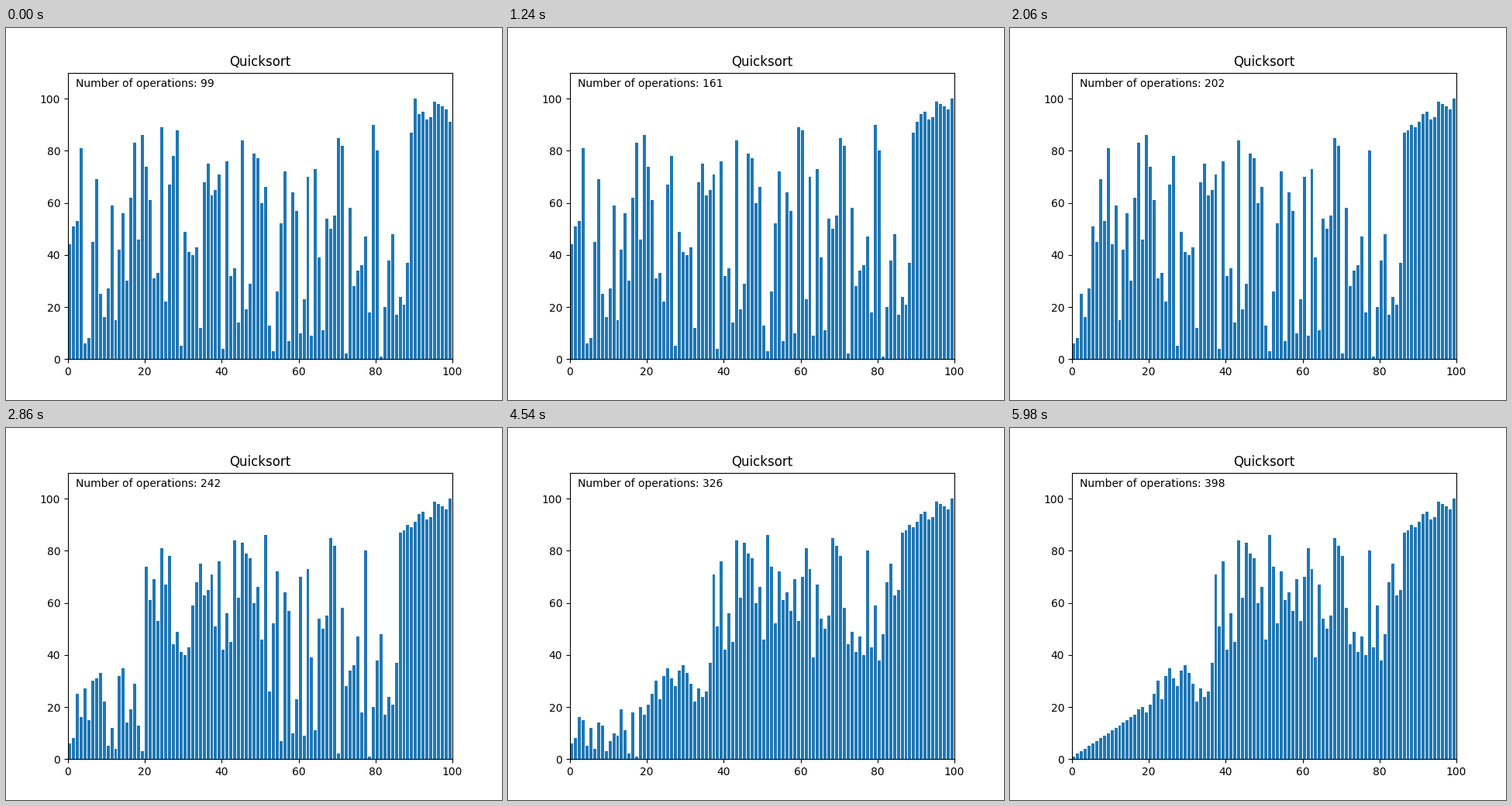
These frames come from a looping animation (640 px wide and 480 px high, 6 s). A matplotlib script:

```python
import itertools

import numpy as np
import matplotlib.pyplot as plt
from matplotlib.animation import FuncAnimation
from matplotlib.collections import PolyCollection

N = 100
FRAMES = 300
FIRST_OP = 99

START = [
    44, 51, 53, 81, 6, 8, 45, 69, 25, 16,
    27, 59, 15, 42, 56, 30, 62, 83, 46, 86,
    74, 61, 31, 33, 89, 22, 67, 78, 88, 5,
    49, 41, 40, 43, 12, 68, 75, 63, 65, 71,
    4, 76, 32, 35, 14, 84, 19, 29, 79, 77,
    60, 66, 13, 3, 26, 52, 72, 7, 64, 57,
    10, 23, 70, 9, 73, 39, 11, 54, 50, 55,
    85, 82, 2, 58, 28, 34, 36, 47, 18, 90,
    80, 1, 20, 38, 48, 17, 24, 21, 37, 87,
    100, 94, 95, 92, 93, 99, 98, 97, 96, 91,
]


def quicksort(a, start, end):
    """Sort a[start..end] in place, yielding a after every operation."""
    if start >= end:
        return
    pivot, split = a[end], start
    for i in range(start, end):
        if a[i] < pivot:
            a[i], a[split] = a[split], a[i]
            split += 1
        yield a
    a[end], a[split] = a[split], a[end]
    yield a
    yield from quicksort(a, start, split - 1)
    yield from quicksort(a, split + 1, end)


# states[k] holds the array after operation FIRST_OP + k
ops = quicksort(START.copy(), 0, N - 1)
states = [s.copy() for s in itertools.islice(ops, FIRST_OP - 1, FIRST_OP - 1 + FRAMES)]

fig, ax = plt.subplots(figsize=(6.4, 4.8), dpi=100)
ax.set_title("Quicksort")
ax.set_xlim(0, N)
ax.set_ylim(0, 1.1 * N)
label = ax.text(0.02, 0.95, "", transform=ax.transAxes)

# One collection for all bars redraws faster than separate rectangles
left = np.arange(N)
corners = np.zeros((N, 4, 2))
corners[:, :2, 0] = left[:, None]
corners[:, 2:, 0] = left[:, None] + 0.8
bars = PolyCollection(corners, facecolors="tab:blue", edgecolors="none", linewidths=0)
ax.add_collection(bars, autolim=False)


def update(frame):
    verts = corners.copy()
    verts[:, 1:3, 1] = np.array(states[frame])[:, None]
    bars.set_verts(verts)
    label.set_text(f"Number of operations: {FIRST_OP + frame}")
    return bars, label


anim = FuncAnimation(fig, update, frames=FRAMES, interval=20, repeat=True, repeat_delay=0)
plt.show()
```
